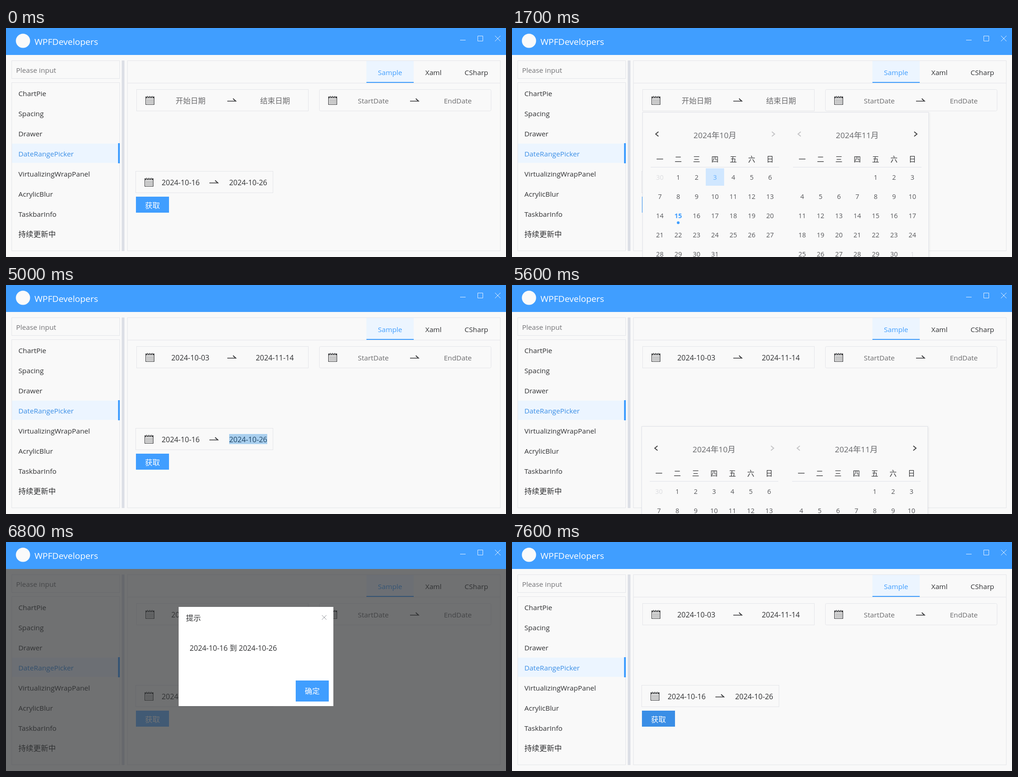
Write an HTML page that moves like this. It is 1089 by 501 pixels and loops after 8 s.

```html
<!DOCTYPE html>
<html lang="zh-CN">
<head>
<meta charset="utf-8">
<title>DateRangePicker</title>
<style>
html, body { margin: 0; width: 100%; height: 100%; overflow: hidden; background: #f9f9f9; }
svg { display: block; font-family: "Open Sans", "Noto Sans CJK SC", "Noto Sans CJK", sans-serif; }
</style>
</head>
<body>
<svg id="stage" width="1089" height="501" viewBox="0 0 1089 501"></svg>
<script>
const LOOP = 8000;
const BLUE = '#409eff', HOVER = '#66b1ff', PRESSED = '#3a8ee6', TINT = '#ecf5ff';
const INK = '#303133', GRAY = '#6b6b6d', FAINT = '#dcdde0', EDGE = '#e4e5e9', PAGE = '#f9f9f9';
const WORD = 15.25, DATE = 15.9, HAN = 16.3;

const rect = (x, y, w, h, fill, extra = '') =>
  `<rect x="${x}" y="${y}" width="${w}" height="${h}" fill="${fill}" ${extra}/>`;
const frame = (x, y, w, h, r = 0) =>
  rect(x + .5, y + .5, w - 1, h - 1, 'none', `stroke="${EDGE}" rx="${r}"`);
const text = (s, x, y, size, fill = INK, extra = '') =>
  `<text x="${x}" y="${y}" font-size="${size}" fill="${fill}" ${extra}>${s}</text>`;
const mid = (s, x, y, size, fill, extra = '') =>
  text(s, x, y, size, fill, `text-anchor="middle" ${extra}`);
const line = (d, color, width = 1) =>
  `<path d="${d}" fill="none" stroke="${color}" stroke-width="${width}"/>`;

function calendarIcon(x, y) {
  let s = line(`M${x + .5} ${y + 2.5}h18v17h-18z`, INK, 1.2) + rect(x, y + 2, 19, 3.5, INK);
  for (const dx of [3, 8, 13]) s += rect(x + dx, y + .5, 2.6, 3.6, INK, `stroke="${PAGE}" stroke-width=".8"`);
  for (let r = 0; r < 4; r++)
    for (let c = 0; c < 5; c++) s += rect(x + 3 + c * 3, y + 8 + r * 2.7, 1.5, 1.3, INK);
  return s;
}

const arrow = (x, y) => line(`M${x} ${y}h18.5l-6-5.5`, INK, 1.7);

function picker(x, y, w, r, from, to, [fromX, toX, arrowX], size, color) {
  return frame(x, y, w, 48, r) + calendarIcon(x + 20, y + 14) + arrow(arrowX, y + 26) +
    mid(from, fromX, y + 31, size, color) + mid(to, toX, y + 31, size, color);
}

function month(x, title, offset, length, showBefore, showAfter, cells) {
  let s = mid(title, x + 140, 241, 17.2, '#66676a') + rect(x, 304, 280, 1, '#dfe1e8');
  [...'一二三四五六日'].forEach((d, c) => s += mid(d, x + 20 + c * 40, 293, 15.5, INK));
  for (let i = 0; i < 35; i++) {
    const cx = x + 20 + i % 7 * 40, row = Math.floor(i / 7) * 42;
    const day = i - offset + 1;
    const outside = day < 1 || day > length;
    if (day < 1 && !showBefore || day > length && !showAfter) continue;
    const label = day < 1 ? 30 + day : day > length ? day - length : day;
    const cell = cells[day] || {};
    const today = cell.today;
    if (cell.fill) s += rect(cx - 20, 307 + row, 40, 38, cell.fill);
    s += mid(label, cx, 332 + row, 14.3, outside ? FAINT : today ? BLUE : cell.ink || '#555659',
      today ? 'font-weight="700"' : '');
    if (today) s += `<circle cx="${cx}" cy="${342 + row}" r="3" fill="${BLUE}"/>`;
  }
  return s;
}

function popup(dx, dy, opacity, october, november) {
  const chevron = (x, dir, color) => line(`M${x - dir * 3} 227l${dir * 6} 5l${-dir * 6} 5`, color, 2);
  return `<g transform="translate(${dx} ${dy})" opacity="${opacity}">` +
    rect(284.5, 184.5, 623, 380, PAGE, 'stroke="#e0e2e8" style="filter:drop-shadow(1px 1px 2px #0001)"') +
    month(302, '2024年10月', 1, 31, true, false, { 15: { today: true }, ...october }) +
    month(612, '2024年11月', 4, 30, false, true, november) +
    chevron(316, -1, '#444') + chevron(569, 1, '#c4c4c6') +
    chevron(626, -1, '#c4c4c6') + chevron(879, 1, '#444') + '</g>';
}

const items = ['ChartPie', 'Spacing', 'Drawer', 'DateRangePicker', 'VirtualizingWrapPanel',
  'AcrylicBlur', 'TaskbarInfo', '持续更新中'];

const titleBar = rect(0, 0, 1089, 59, BLUE) + '<circle cx="37" cy="28" r="15.5" fill="#fafafa"/>' +
  text('WPFDevelopers', 62, 37, 19, '#fff') +
  line('M989 26.5h12M1027.5 17.5h11v11h-11zM1065 17l12 12m0-12l-12 12', '#e3f0ff');

const sidebar = frame(12, 71, 236, 40) + text('Please input', 22, 98, WORD, '#737376') +
  frame(12, 119, 236, 369) + rect(13, 253, 231, 42, TINT) + rect(244, 252, 4, 44, BLUE) +
  items.map((name, i) => text(name, 27, 149 + i * 44,
    i === 7 ? HAN : WORD, i === 3 ? PRESSED : INK)).join('') +
  rect(252, 71, 6, 417, '#dcdfe6');

const panel = frame(264, 71, 813, 417) + rect(265, 120, 811, 1, EDGE) +
  rect(785, 72, 103, 46, TINT) + rect(785, 118, 103, 2, BLUE) +
  mid('Sample', 836.5, 103, WORD, BLUE) + mid('Xaml', 931, 103, WORD, INK) +
  picker(682, 134, 375, 3, 'StartDate', 'EndDate', [800, 984, 880], WORD, GRAY);

function dialog(hover) {
  return rect(376, 142, 337, 217, '#fff') + text('提示', 392, 172, HAN) +
    line('M688 160l10 10m0-10l-10 10', '#909399') +
    text('2024-10-16 到 2024-10-26', 400, 238, DATE) +
    rect(631, 303, 72, 46, hover ? HOVER : BLUE) + mid('确定', 667, 332, HAN, '#fff');
}

function dayStart(t) {
  if (t < 1600) return {};
  if (t < 1700) return { fill: '#e5f1fd', ink: HOVER };
  if (t < 2100) return { fill: '#d0e7ff', ink: HOVER };
  return { fill: t < 2300 ? '#d0e7ff' : BLUE, ink: '#fff' };
}

// Picture for a time that is a multiple of 100 ms
function draw(t) {
  const during = (a, b) => t >= a && t < b;
  const fade = start => Math.min(1, (t - start + 100) / 300);
  const lit = { fill: '#d0e7ff', ink: HOVER };
  const picked = t >= 3100;

  let s = sidebar + panel + mid('CSharp', 1024.5, 103, WORD, during(200, 300) ? BLUE : INK);
  s += picked
    ? picker(284, 134, 375, 0, '2024-10-03', '2024-11-14', [401.5, 585.5, 482], DATE, INK)
    : picker(284, 134, 375, 0, '开始日期', '结束日期', [402, 586, 482], HAN, GRAY);

  s += picker(282, 313, 300, 0, '2024-10-16', '2024-10-26', [380.5, 527.5, 443], DATE, INK);
  if (during(5000, 6100)) s += rect(486, 326, 83, 22, '#0078d7', 'opacity=".32"');
  if (during(6100, 6500)) s += rect(521, 326, 1, 22, INK);

  const button = t >= 7600 ? PRESSED : t >= 6600 ? HOVER : t >= 6500 ? '#53a8ff' : BLUE;
  s += rect(283, 369, 72, 35, button) + mid('获取', 319, 394, HAN, '#fff');

  if (during(1100, 3100)) {
    const november = during(2500, 2600) ? { 13: lit } : t >= 2600 ? { 14: lit } : {};
    s += popup(0, 0, fade(1100), { 3: dayStart(t) }, november);
  }
  if (during(5100, 6100)) s += popup(-2, 125, t < 6000 ? fade(5100) : .4, {}, {});

  if (during(6800, 7600)) s += rect(0, 59, 1089, 442, 'rgba(48,49,51,.68)');
  if (during(6800, 7500)) s += dialog(t >= 7300);
  return s + titleBar;
}

const stage = document.getElementById('stage');
const start = performance.now();
let shown = -1;

function tick() {
  const t = Math.floor((performance.now() - start) % LOOP / 100) * 100;
  if (t !== shown) stage.innerHTML = draw(shown = t);
  requestAnimationFrame(tick);
}
tick();
</script>
</body>
</html>
```
